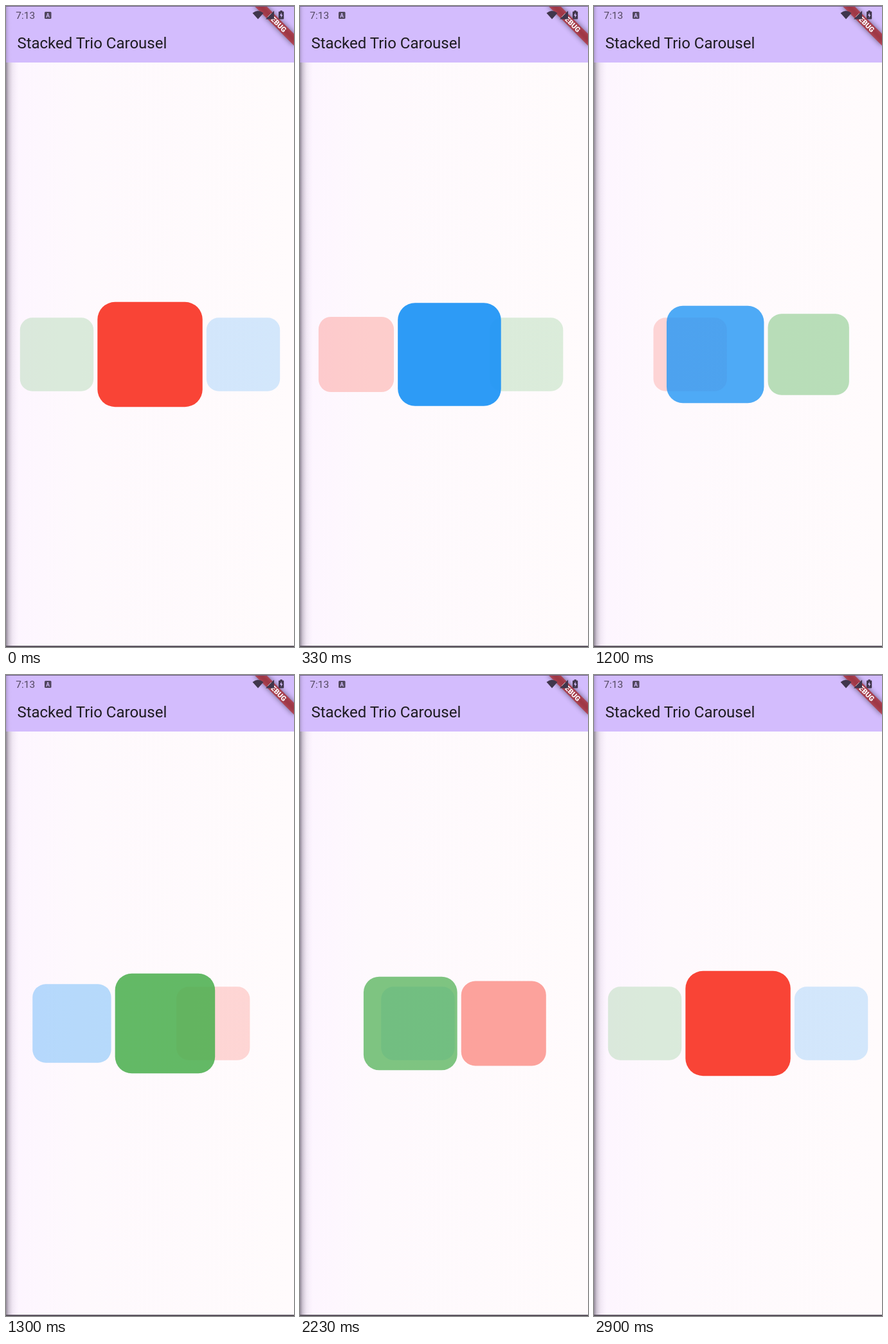
Recreate the animation shown at these times as an HTML page. Size 448 px wide and 998 px high, loop 2930 ms.

```html
<!DOCTYPE html>
<html lang="en">
<head>
<meta charset="utf-8">
<title>Stacked Trio Carousel</title>
<style>
  html, body { margin: 0; width: 100%; height: 100%; overflow: hidden; background: #fefafd; }
  svg { display: block; font-family: Roboto, sans-serif; }
</style>
</head>
<body>
<svg width="448" height="998" viewBox="0 0 448 998">
  <defs>
    <linearGradient id="edge">
      <stop offset="0" stop-color="#4a4052" stop-opacity=".6"/>
      <stop offset=".2" stop-color="#5a4e66" stop-opacity=".3"/>
      <stop offset=".5" stop-color="#8a7898" stop-opacity=".12"/>
      <stop offset="1" stop-color="#d8b8f0" stop-opacity="0"/>
    </linearGradient>
    <linearGradient id="page">
      <stop offset="0" stop-color="#fdf5ff"/>
      <stop offset=".25" stop-color="#fef9fd"/>
      <stop offset="1" stop-color="#fffbfc"/>
    </linearGradient>
    <filter id="blur" x="-20%" y="-100%" width="140%" height="300%">
      <feGaussianBlur stdDeviation="4"/>
    </filter>
  </defs>

  <rect width="448" height="998" fill="url(#page)"/>
  <g id="cards"></g>

  <rect width="448" height="88" fill="#d3bcfd"/>
  <rect y="88" width="20" height="910" fill="url(#edge)"/>
  <rect width="10" height="88" fill="url(#edge)" opacity=".5"/>
  <text x="17.4" y="65.7" font-size="24" fill="#1d1b20">Stacked Trio Carousel</text>

  <!-- debug ribbon -->
  <g transform="translate(448 0) rotate(45)">
    <rect x="-43.6" y="30.5" width="87.2" height="13.1" opacity=".5" filter="url(#blur)"/>
    <rect x="-43.6" y="30.5" width="87.2" height="13.1" fill="#b71c1c" fill-opacity=".63"/>
    <text y="41" font-size="11.1" font-weight="900" text-anchor="middle" fill="#fff">DEBUG</text>
  </g>

  <!-- status bar -->
  <text x="15.3" y="20" font-size="15.5" fill="#51475f">7:13</text>
  <rect x="60" y="9" width="10.5" height="11" rx="1.5" fill="#51475f"/>
  <text x="65.2" y="17.8" font-size="8.5" font-weight="700" text-anchor="middle" fill="#d3bcfd">A</text>
  <g fill="#40364c">
    <path d="M383.500 11Q392 4 400.500 11L392 20.500Z"/>
    <path d="M404 20.500L417 7.500V20.500Z"/>
    <path d="M424 9.500q0-1 1-1h1.500v-1.500h3.200v1.500h1.500q1 0 1 1v10q0 1-1 1h-6.200q-1 0-1-1z"/>
  </g>
  <path d="M428.600 10.300l-2.600 4.700h1.800v3.600l2.600-4.800h-1.800z" fill="#d3bcfd"/>

  <rect width="448" height="1" fill="#6d5f82"/>
  <rect y="996" width="448" height="2" fill="#5b545f"/>
</svg>
<script>
  const LOOP = 2930, MOVE = 245, STARTS = [124, 1120.5, 2130.6];
  const MID = 224, STEP = 145, CY = 542.5, SIZE = 163.4, RADIUS = 27.3;
  const SMALL = 0.7, FAINT = 0.2;
  const COLORS = ['#f94436', '#2397f6', '#4cb050'];
  const group = document.getElementById('cards');

  const cards = COLORS.map(color => {
    const rect = document.createElementNS('http://www.w3.org/2000/svg', 'rect');
    rect.setAttribute('fill', color);
    group.append(rect);
    return rect;
  });

  const mix = (a, b, k) => a + (b - a) * k;

  function ease(x) {
    x = Math.min(1, Math.max(0, x));
    return (1 - Math.cos(Math.PI * x)) / 2;
  }

  function place(rect, slot, focus) {
    const scale = mix(SMALL, 1, focus), size = SIZE * scale;
    const attrs = {
      x: MID + slot * STEP - size / 2, y: CY - size / 2,
      width: size, height: size, rx: RADIUS * scale,
      opacity: mix(FAINT, 1, focus)
    };
    for (const name in attrs) rect.setAttribute(name, attrs[name]);
  }

  function draw(t) {
    const turn = Math.max(0, STARTS.filter(s => t >= s).length - 1);
    const p = ease((t - STARTS[turn]) / MOVE);
    const [front, next, back] = [0, 1, 2].map(i => cards[(turn + i) % 3]);
    place(front, -p, 1 - p);
    place(next, 1 - p, p);
    place(back, mix(-1, 1, p), 0);
    // the card crossing from left to right passes behind the others
    if (group.firstChild !== back) group.prepend(back);
  }

  const begin = performance.now();
  function tick() {
    draw((performance.now() - begin) % LOOP);
    requestAnimationFrame(tick);
  }
  tick();
</script>
</body>
</html>
```
